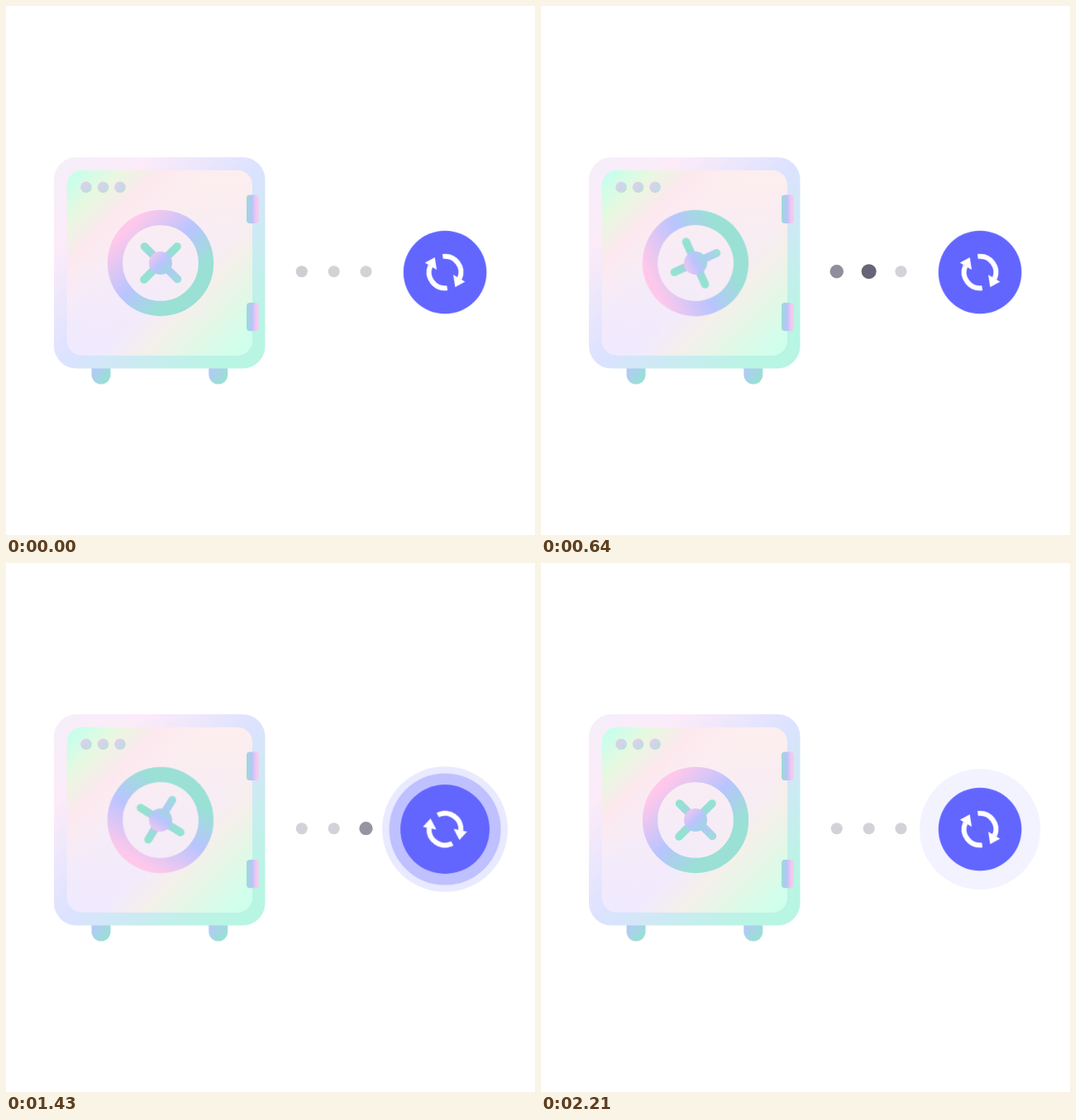
Recreate the animation shown at these times as an HTML page. Size 640 by 640 pixels, loop 3.21 s.

```html
<!DOCTYPE html>
<html lang="en">
<head>
<meta charset="utf-8">
<title>Safe sync</title>
<style>
  html, body { margin: 0; width: 100%; height: 100%; overflow: hidden; background: #fff; }
  svg { display: block; width: 100%; height: 100%; }

  /* The script sets the time of every animation. */
  .wheel, .dot, .halo, .disc, .arrows { animation: 1s linear paused; }

  .wheel { animation-name: turn; animation-duration: 2214.3ms; }
  @keyframes turn {
    0% { transform: rotate(0deg); }
    19.35% { transform: rotate(198deg); }
    29.03% { transform: rotate(291deg); }
    41.94% { transform: rotate(433deg); }
    54.84% { transform: rotate(544deg); animation-timing-function: cubic-bezier(.33, .43, .67, .82); }
    77.42% { transform: rotate(684deg); animation-timing-function: cubic-bezier(.33, .7, .67, 1); }
    100% { transform: rotate(720deg); }
  }

  .dot { r: 7px; fill: #d3d2d8; animation-name: blink; animation-duration: 820ms; animation-delay: var(--at); }
  @keyframes blink { 50% { r: 10px; fill: #2c2b45; } }

  .halo { r: var(--small); fill: #6266ff; opacity: 0; animation-name: pulse; animation-duration: 1300ms; animation-delay: var(--at); }
  @keyframes pulse { 50% { r: var(--large); opacity: var(--peak); } }

  .disc { r: 50.3px; fill: #6266ff; animation-name: swell; animation-duration: 1030ms; animation-delay: 780ms; }
  @keyframes swell { 50% { r: 55.2px; } }

  .arrows { animation-name: spin; animation-delay: 714ms; animation-timing-function: ease; }
  @keyframes spin { to { transform: rotate(360deg); } }
</style>
</head>
<body>
<svg viewBox="0 0 640 640">
  <defs>
    <linearGradient id="body" x1="0" y1="0" x2="1" y2="1">
      <stop offset=".05" stop-color="#f6eef9"/>
      <stop offset=".22" stop-color="#fcebf9"/>
      <stop offset=".5" stop-color="#dce2ff"/>
      <stop offset=".88" stop-color="#b8f5e3"/>
    </linearGradient>
    <linearGradient id="door" x1="0" y1="0" x2="0" y2="1">
      <stop offset="0" stop-color="#fdeeee"/>
      <stop offset="1" stop-color="#f0eaff"/>
    </linearGradient>
    <linearGradient id="sheen" x1="0" y1="0" x2="1" y2="1">
      <stop offset=".03" stop-color="#c6ffec"/>
      <stop offset=".14" stop-color="#e8f8e0"/>
      <stop offset=".25" stop-color="#fce8ee"/>
      <stop offset=".4" stop-color="#fcecf2" stop-opacity="0"/>
      <stop offset=".58" stop-color="#f5eeee" stop-opacity="0"/>
      <stop offset=".7" stop-color="#f4f0ea"/>
      <stop offset=".82" stop-color="#e2f8e6"/>
      <stop offset=".94" stop-color="#d0ffec"/>
    </linearGradient>
    <linearGradient id="stud" x1="0" y1="0" x2="1" y2="1">
      <stop offset=".1" stop-color="#e2cfe8"/>
      <stop offset=".5" stop-color="#cfd5e7"/>
      <stop offset=".95" stop-color="#b8e0da"/>
    </linearGradient>
    <linearGradient id="hinge">
      <stop offset="0" stop-color="#9bdcd5"/>
      <stop offset=".45" stop-color="#b5c4fa"/>
      <stop offset=".8" stop-color="#f9c6ec"/>
      <stop offset="1" stop-color="#e9cdf4"/>
    </linearGradient>
    <linearGradient id="foot" x1="0" y1="0" x2="1" y2="1">
      <stop offset=".2" stop-color="#b4c8f7"/>
      <stop offset=".8" stop-color="#9adfd6"/>
    </linearGradient>
    <linearGradient id="rim" gradientUnits="userSpaceOnUse" x1="-46" y1="-46" x2="46" y2="46">
      <stop offset=".05" stop-color="#ffc8ea"/>
      <stop offset=".47" stop-color="#b9c4ff"/>
      <stop offset=".8" stop-color="#9ae0d5"/>
    </linearGradient>
    <linearGradient id="hub" x1="0" y1="0" x2="1" y2="1">
      <stop offset=".1" stop-color="#f3c5ee"/>
      <stop offset=".5" stop-color="#b9c4fd"/>
      <stop offset=".9" stop-color="#9dd8dd"/>
    </linearGradient>
    <linearGradient id="spokeA" gradientUnits="userSpaceOnUse" x1="-23" y1="-23" x2="23" y2="23">
      <stop offset=".05" stop-color="#92e4cf"/>
      <stop offset=".3" stop-color="#a2d5e0"/>
      <stop offset=".7" stop-color="#b3c8f8"/>
      <stop offset="1" stop-color="#9bdfd6"/>
    </linearGradient>
    <linearGradient id="spokeB" gradientUnits="userSpaceOnUse" x1="-23" y1="23" x2="23" y2="-23">
      <stop offset="0" stop-color="#92e4cf"/>
      <stop offset=".5" stop-color="#a0d6df"/>
      <stop offset="1" stop-color="#92e4cf"/>
    </linearGradient>
    <path id="leg" d="M0 0h23v16a11.5 11.5 0 0 1-23 0z"/>
    <g id="arrow">
      <path d="M-2.7-19.1A19.3 19.3 0 0 1 17.7 7.7" fill="none" stroke="#fff" stroke-width="6"/>
      <path d="M10 3L24.3 11.5L12.3 18z" fill="#fff"/>
    </g>
  </defs>

  <use href="#leg" x="103.5" y="430" fill="url(#foot)"/>
  <use href="#leg" x="245.3" y="430" fill="url(#foot)"/>
  <rect x="58" y="183" width="255.5" height="255.5" rx="27" fill="url(#body)"/>
  <g>
    <rect x="73.7" y="198.7" width="224.3" height="224" rx="18" fill="url(#door)"/>
    <rect x="73.7" y="198.7" width="224.3" height="224" rx="18" fill="url(#sheen)"/>
  </g>
  <g fill="url(#stud)">
    <circle cx="97" cy="219.3" r="6.8"/>
    <circle cx="117.5" cy="219.3" r="6.8"/>
    <circle cx="138" cy="219.3" r="6.8"/>
  </g>
  <g fill="url(#hinge)">
    <rect x="291" y="228.5" width="14.7" height="34.5" rx="4"/>
    <rect x="291" y="359" width="14.7" height="34.3" rx="4"/>
  </g>

  <g transform="translate(187 311)">
    <g class="wheel" fill="none" stroke-linecap="round">
      <circle r="55" stroke="url(#rim)" stroke-width="18.3"/>
      <path d="M-19.5-20L20.5 19.5" stroke="url(#spokeA)" stroke-width="9.6"/>
      <path d="M-20 20L20-20" stroke="url(#spokeB)" stroke-width="9.6"/>
      <circle r="14" fill="url(#hub)"/>
    </g>
  </g>

  <circle class="dot" cx="357.8" cy="321.2" r="7" style="--at: -10ms"/>
  <circle class="dot" cx="396.7" cy="321.2" r="7" style="--at: 376ms"/>
  <circle class="dot" cx="435.5" cy="321.2" r="7" style="--at: 761ms"/>

  <g transform="translate(531.1 322.1)">
    <circle class="halo" style="--at: 1100ms; --small: 69.3px; --large: 82.3px; --peak: .28"/>
    <circle class="halo" style="--at: 814ms; --small: 60.1px; --large: 68px; --peak: .33"/>
    <circle class="disc" r="50.3"/>
    <g class="arrows">
      <use href="#arrow"/>
      <use href="#arrow" transform="rotate(180)"/>
    </g>
  </g>
</svg>
<script>
  const LOOP = 3210, STEP = 1000 / 14, LAST_STEP = 31;
  const animations = document.getAnimations();
  const start = performance.now();

  // Motion runs at 14 steps per second, then holds until the loop ends.
  function render() {
    const time = (performance.now() - start) % LOOP;
    const step = Math.min(LAST_STEP, Math.floor((time + 5) / STEP));
    for (const animation of animations) animation.currentTime = step * STEP;
    requestAnimationFrame(render);
  }
  render();
</script>
</body>
</html>
```
